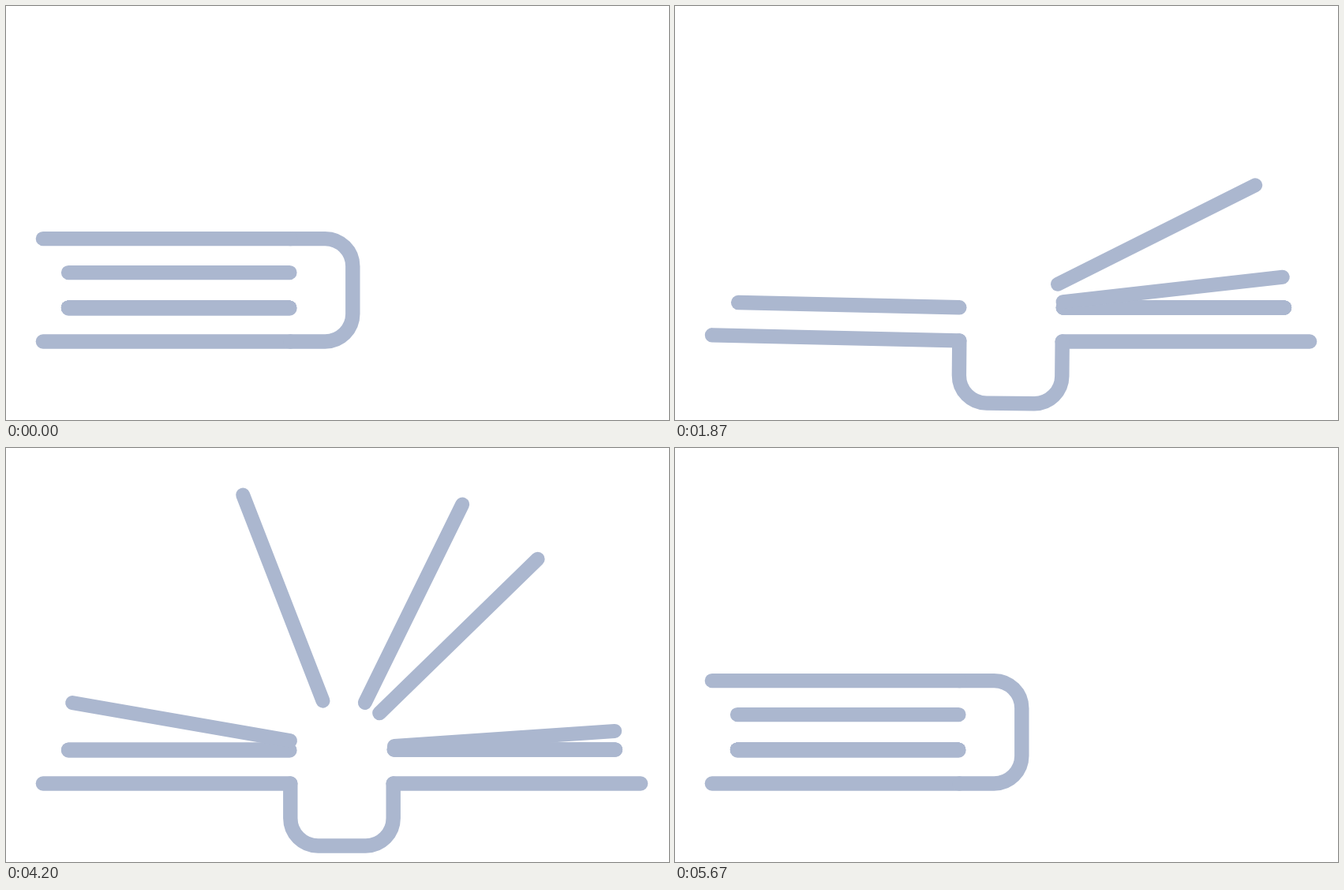
An HTML page with a canvas for the animation above (6190 ms loop, 840 by 525 pixels).

```html
<!DOCTYPE html>
<html lang="en">
<head>
<meta charset="utf-8">
<title>Book loader</title>
<style>
  html, body { margin: 0; width: 100%; height: 100%; overflow: hidden; background: #fff; }
  canvas { display: block; }
</style>
</head>
<body>
<canvas id="stage" width="840" height="525"></canvas>
<script>
const ctx = document.getElementById('stage').getContext('2d');

const LOOP = 6190, STEP = 200 / 3;
const MID = 425.5, HINGE_Y = 425.5;
const SPAN = 130.4, DEPTH = 79, CORNER = 35;
const COVER = 313.4;
const PAGE_IN = 66.5, PAGE_OUT = 346.5, PAGE_Y = 382.6, TURN = 600;

// start times of each page, turning right and then back left
const FORTH = [412, 482, 570, 663, 868, 986, 1108, 1228, 1347, 1427];
const BACK = [3540, 3604, 3699, 3858.5, 3951.5, 3994, 4137, 4240, 4340, 4435];

// cubic-bezier(.42, 0, .58, 1)
function ease(x) {
  if (x <= 0) return 0;
  if (x >= 1) return 1;
  let lo = 0, hi = 1, s = x;
  for (let i = 0; i < 24; i++) {
    s = (lo + hi) / 2;
    const r = 1 - s;
    const bx = 1.26 * s * r * r + 1.74 * s * s * r + s * s * s;
    if (bx < x) lo = s; else hi = s;
  }
  return s * s * (3 - 2 * s);
}

const between = (t, from, to) => ease((t - from) / (to - from));

function line(x1, y1, x2, y2) {
  ctx.beginPath();
  ctx.moveTo(x1, y1);
  ctx.lineTo(x2, y2);
  ctx.stroke();
}

// cover and its inner leaf, hinge at the origin, pointing right
function cover(gap) {
  line(0, 0, COVER, 0);
  line(0.9, -gap, 281.2, -gap);
}

function spine() {
  ctx.beginPath();
  ctx.moveTo(0, 0);
  ctx.arcTo(0, DEPTH, SPAN / 2, DEPTH, CORNER);
  ctx.arcTo(SPAN, DEPTH, SPAN, 0, CORNER);
  ctx.lineTo(SPAN, 0);
  ctx.stroke();
}

// shut: 0 open, 1 closed; lag: how far the swinging cover trails the spine
function book(shut, lag, flipped) {
  const swing = shut + lag * shut * (1 - shut) ** 2;
  const tilt = -shut * Math.PI / 2;
  ctx.save();
  ctx.translate(MID, HINGE_Y);
  if (flipped) ctx.scale(-1, 1);
  ctx.translate(-SPAN / 2, 0);

  ctx.save();
  ctx.scale(-1, 1);
  cover(flipped ? 43 : 42);
  ctx.restore();

  ctx.rotate(tilt);
  spine();
  ctx.translate(SPAN, 0);
  ctx.rotate(-swing * Math.PI - tilt);
  cover(flipped ? 42 : 43);
  ctx.restore();
}

function page(turn) {
  ctx.save();
  ctx.translate(MID, PAGE_Y);
  ctx.rotate(turn * Math.PI);
  line(-PAGE_IN, 0, -PAGE_OUT, 0);
  ctx.restore();
}

function draw(t) {
  ctx.fillStyle = '#fff';
  ctx.fillRect(0, 0, 840, 525);
  ctx.strokeStyle = '#abb7cf';
  ctx.lineWidth = 18.4;
  ctx.lineCap = 'round';
  ctx.lineJoin = 'round';

  const flipped = t > 1200 && t < 4400;
  const opening = t < 1200 || (t > 2800 && t < 4400);
  const shut = flipped
    ? between(t, 1833, 2453) - between(t, 3153, 3803)
    : 1 - between(t, 30, 680) + between(t, 5030, 5650);
  book(shut, opening ? 0.41 : 0.25, flipped);

  ctx.lineWidth = 18;
  FORTH.forEach((start, i) => {
    page(ease((t - start) / TURN) - ease((t - BACK[i]) / TURN));
  });
}

function frame() {
  const t = performance.now() % LOOP;
  draw(Math.floor((t + 3.4) / STEP) * STEP);
  requestAnimationFrame(frame);
}
frame();
</script>
</body>
</html>
```
